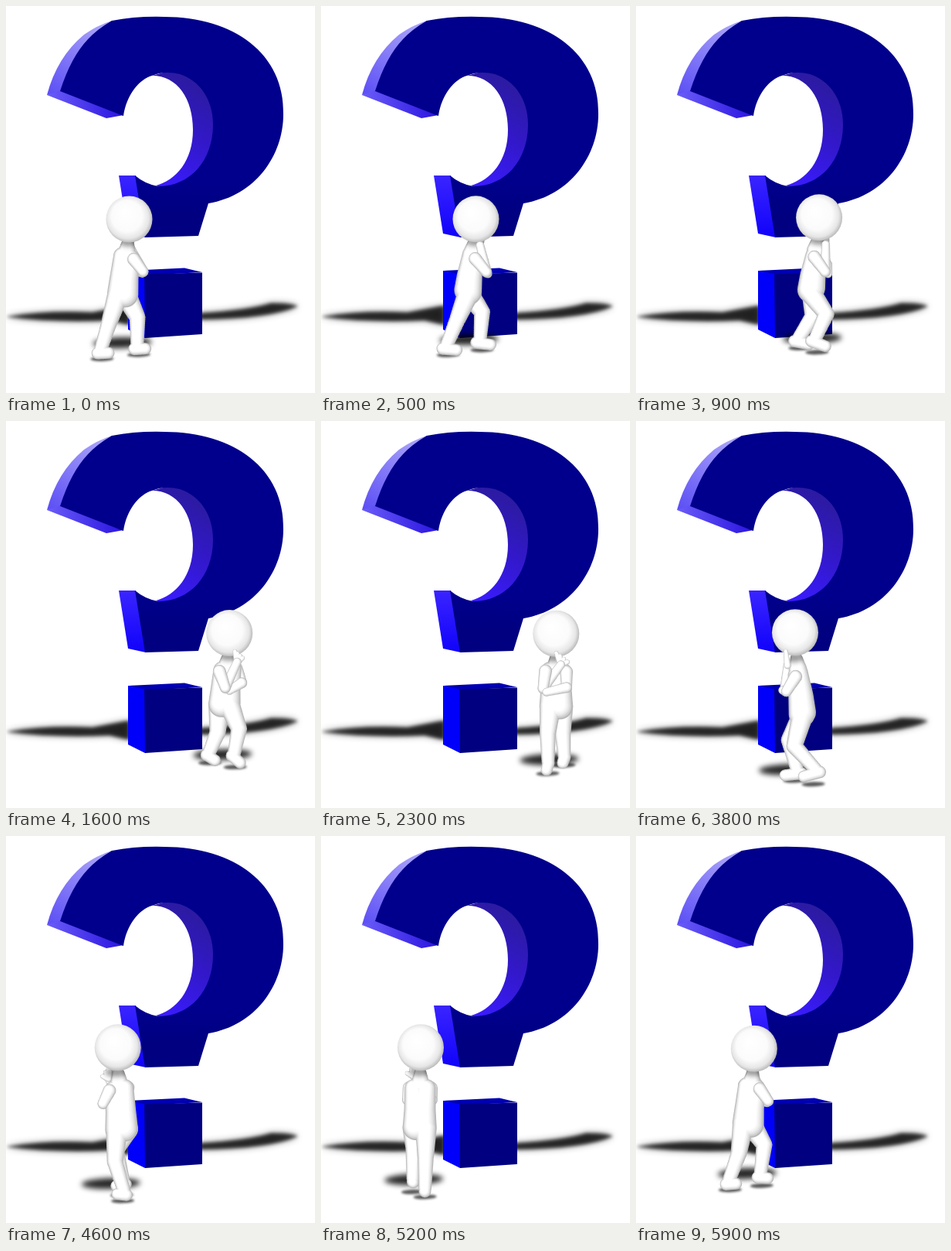
Animation, 400 px wide and 500 px high, one loop 6 s. Source, as an HTML page with a canvas:

```html
<!DOCTYPE html>
<html lang="en">
<head>
<meta charset="utf-8">
<title>Pacing thinker</title>
<style>
  html, body { margin: 0; width: 100%; height: 100%; overflow: hidden; background: #fff; }
  svg, canvas { position: absolute; left: 0; top: 0; }
</style>
</head>
<body>
<svg width="400" height="500" viewBox="0 0 400 500">
  <defs>
    <filter id="core" x="-20%" y="-60%" width="140%" height="220%"><feGaussianBlur stdDeviation="2.2"/></filter>
    <filter id="halo" x="-20%" y="-60%" width="140%" height="220%"><feGaussianBlur stdDeviation="5"/></filter>
    <linearGradient id="rim" x1="0" y1="1" x2=".7" y2="0">
      <stop offset="0" stop-color="#5a4df5"/><stop offset="1" stop-color="#a8a2fa"/>
    </linearGradient>
    <linearGradient id="under">
      <stop offset="0" stop-color="#6a5cf8"/><stop offset="1" stop-color="#2a14e0"/>
    </linearGradient>
    <linearGradient id="wall" x1=".6" y1="0" x2=".3" y2="1">
      <stop offset="0" stop-color="#2a1b98"/><stop offset=".5" stop-color="#3218c8"/><stop offset="1" stop-color="#3a1cff"/>
    </linearGradient>
    <linearGradient id="stem" x2="0" y2="1">
      <stop offset="0" stop-color="#3a24ff"/><stop offset="1" stop-color="#1002fa"/>
    </linearGradient>
    <linearGradient id="face" x2="0" y2="1">
      <stop offset=".75" stop-color="#00008c"/><stop offset=".9" stop-color="#000080"/>
    </linearGradient>
    <path id="streaks" d="M2 401Q55 393 112 396L160 387V412L134 406Q65 409 2 402ZM250 397Q315 393 343 384Q370 384 378 388Q340 404 250 405Z"/>
  </defs>
  <use href="#streaks" filter="url(#halo)" opacity=".5"/>
  <use href="#streaks" filter="url(#core)" opacity=".75"/>
  <path fill="url(#wall)" d="M189 90C222 90 242 120 242 160C242 200 220 225 194 232L215 240L275 200V110L225 80Z"/>
  <path fill="url(#rim)" d="M53 115Q66 66 101 37Q118 25 137 19L140 26L74 112Z"/>
  <path fill="url(#under)" d="M53 115L70 109L152 141L130 145Z"/>
  <path fill="url(#stem)" d="M146 219L168 219L181 299L158 294Z"/>
  <path fill="url(#face)" d="M70 110Q84 66 106 43Q118 30 137 19Q168 13 205 14C295 14 361 62 359 140C359 193 323 245 262 255L249 297L180 299L167 219Q180 230 197 233C238 233 268 200 268 153C268 120 250 96 225 88Q205 83 189 90C172 95 156 115 152 142Z"/>
  <path fill="#0000b2" d="M158 342L231 338.5L254 344L179 348Z"/>
  <path fill="#0000fa" d="M158 342L180 346.5V429L158 418Z"/>
  <path fill="#000080" d="M179 346.5L254 344.5V424L180 429Z"/>
</svg>
<canvas id="stage" width="400" height="500"></canvas>
<script>
const ctx = document.getElementById('stage').getContext('2d');
const LOOP = 6000, STEP = 100, TAU = Math.PI * 2;
const SHADES = [184, 208, 226, 239, 248, 255];

// Stride count over the loop: [ms, strides]
const STRIDES = [[0, 0], [900, .84], [2300, 1.92], [3100, 2.72], [3800, 3.17], [4600, 3.83], [6000, 5]];

const mix = (a, b, k) => a + (b - a) * k;

function strideAt(t) {
  const i = STRIDES.findIndex(s => s[0] > t);
  const [t0, a] = STRIDES[i - 1], [t1, b] = STRIDES[i];
  return mix(a, b, (t - t0) / (t1 - t0));
}

// Tapered limbs, shaded by nested lighter fills shifted toward the light
function drawLimbs(limbs) {
  SHADES.forEach((shade, i) => {
    ctx.fillStyle = `rgb(${shade},${shade},${shade})`;
    ctx.beginPath();
    for (const [a, ra, b, rb] of limbs) {
      for (let n = 0; n <= 14; n++) {
        const k = n / 14, r0 = mix(ra, rb, k), r = r0 * (1 - i * .09);
        const x = mix(a.x, b.x, k) - i * r0 * .03, y = mix(a.y, b.y, k) - i * r0 * .03;
        ctx.moveTo(x + r, y);
        ctx.arc(x, y, r, 0, TAU);
      }
    }
    ctx.fill();
  });
}

function drawHead({ x, y }) {
  const g = ctx.createRadialGradient(x - 6, y - 9, 2, x - 1, y - 1, 32);
  g.addColorStop(0, '#fff');
  g.addColorStop(.6, '#fbfbfb');
  g.addColorStop(.84, '#e6e6e6');
  g.addColorStop(1, '#b4b4b4');
  ctx.fillStyle = g;
  ctx.beginPath();
  ctx.arc(x, y, 30, 0, TAU);
  ctx.fill();
}

function drawShadow(x, y, rx, ry, blur, alpha) {
  ctx.filter = `blur(${blur}px)`;
  ctx.fillStyle = `rgba(0,0,0,${alpha})`;
  ctx.beginPath();
  ctx.ellipse(x, y, rx, ry, -.03, 0, TAU);
  ctx.fill();
  ctx.filter = 'none';
}

function draw(t) {
  // The figure walks a circle: right at the back, left at the front
  const turn = (t - 680) / LOOP * TAU;
  const hx = Math.cos(turn), hz = Math.sin(turn);
  const stride = strideAt(t) * TAU, swing = Math.cos(stride);
  const baseX = 217 + 88 * hz;
  const ground = 456 - 10 * hx - 4 * hz;
  const scale = (ground - 272.5 - 3 * swing * swing) / 184;

  // f: forward, s: to the figure's left, u: up
  const at = (f, s, u) => {
    const z = f * hz - s * hx;
    return { x: baseX + scale * (f * hx + s * hz) - 2 * (1 - u / 184), y: ground + .25 * z - u * scale, z };
  };

  function leg(side, phase) {
    const s = side * 8, hipF = -11, hipU = 84;
    const f = -16 + 26 * Math.cos(phase);
    const lift = Math.max(0, -Math.sin(phase)) * 7, u = 12 + lift;
    const df = f - hipF, du = u - hipU, d = Math.hypot(df, du);
    const bend = Math.sqrt(Math.max(0, 39 * 39 - d * d / 4));
    const hip = at(hipF, s, hipU), ankle = at(f, s, u);
    const knee = at((hipF + f) / 2 - du / d * bend, s, (hipU + u) / 2 + df / d * bend);
    return {
      z: ankle.z, floor: at(f + 3, s, 0),
      limbs: [[hip, 14, knee, 10.5], [knee, 10.5, ankle, 8.5], [at(f - 5, s, u - 3), 8, at(f + 15, s, 6 + lift * .5), 7.5]]
    };
  }

  const legs = [leg(-1, stride), leg(1, stride + Math.PI)].sort((a, b) => a.z - b.z);
  const torso = [-1, 1].flatMap(s => {
    const chest = at(-4, s * 8, 133), belly = at(-8, s * 5, 105), pelvis = at(-10, s * 5, 85);
    return [[chest, 12, belly, 15.5], [belly, 15.5, pelvis, 17]];
  });
  torso.push([at(-2, 0, 152), 8, at(-4, 0, 138), 12]);

  // Right hand holds the chin, left arm lies across the chest
  const elbowR = at(13, -15, 114), handR = at(8, 8, 145);
  const elbowL = at(8, 16, 115), handL = at(16, -10, 110);
  const fingers = [0, 1, 2, 3].map(i => [handR, 4.5, at(11 - i, 2 + i * 5, 161 - i * 4), 2.8]);
  const part = (z, ...limbs) => ({ z, paint: () => drawLimbs(limbs) });
  const midZ = (a, b) => (a.z + b.z) / 2;

  const parts = [
    { z: 0, paint() {
      drawLimbs(legs[0].limbs);
      drawLimbs([...legs[1].limbs, ...torso]);
      // Shade under the chin, kept inside the body
      const chin = at(2, 0, 153);
      ctx.globalCompositeOperation = 'source-atop';
      drawShadow(chin.x, chin.y, 15, 6, 3, .4);
      ctx.globalCompositeOperation = 'source-over';
    } },
    { z: .1, paint: () => drawHead(at(0, 0, 184)) },
    part(elbowR.z, [at(-3, -14, 133), 8.5, elbowR, 7]),
    part(elbowL.z, [at(-3, 14, 133), 8.5, elbowL, 7]),
    part(midZ(elbowL, handL), [elbowL, 7, handL, 5.5]),
    part(midZ(elbowR, handR) + .2, [elbowR, 7, handR, 5.5]),
    part(handR.z + .3, ...fingers)
  ].sort((a, b) => a.z - b.z);

  ctx.clearRect(0, 0, 400, 500);
  drawShadow(baseX - 9, ground - 16, 38, 7, 3.5, .85);
  for (const { floor } of legs) drawShadow(floor.x, floor.y, 15, 3, 1.5, .65);
  parts.forEach(p => p.paint());
}

function tick() {
  draw(Math.floor(performance.now() % LOOP / STEP) * STEP);
  requestAnimationFrame(tick);
}
tick();
</script>
</body>
</html>
```
